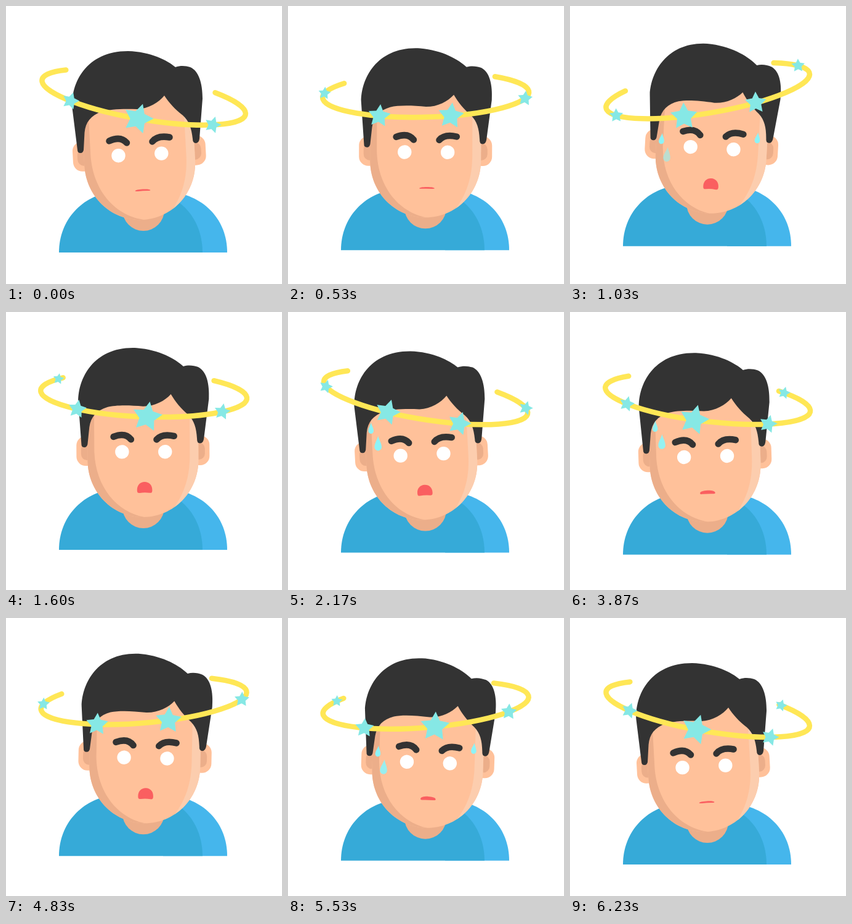
Animation of 448x450 px, one loop 6260 ms. Source, as an HTML page with a canvas:

```html
<!DOCTYPE html>
<html lang="en">
<head>
<meta charset="utf-8">
<title>Dizzy</title>
<style>
  html, body { margin: 0; width: 100%; height: 100%; overflow: hidden; background: #fff; }
  canvas { display: block; width: 448px; height: 450px; }
</style>
</head>
<body>
<canvas id="stage" width="448" height="450"></canvas>
<script>
const ctx = document.getElementById('stage').getContext('2d');
const LOOP = 6260, FRAMES = 188, PASS = 47;
const TAU = Math.PI * 2, RAD = Math.PI / 180, LEAN = 3.15 * RAD;

const C = {
  shirt: '#36aad8', shirtLight: '#45b6ec',
  skin: '#ffc19a', shade: '#ecae8a', light: '#fccdae',
  hair: '#333333', mouth: '#fa5f60',
  ring: '#ffe756', star: '#86e8e5', drop: '#8df3f7'
};

const P = {
  shirtLight: new Path2D('M255 301H270C322 308 359 346 359 399H255Z'),
  shirt: new Path2D('M86 399C86 346 124 307 172 301L262 308C298 322 319 358 319 399Z'),
  // The face is upright; the head leans it
  face: new Path2D('M133 175V253C133 306 174 346 223 346C272 346 313 306 313 253V175L298 135H148Z'),
  shade: new Path2D('M120 130H144V240C146 300 184 342 232 347V360H120Z'),
  glow: new Path2D('M330 130H299V245C299 285 288 315 262 345H330Z'),
  hair: new Path2D('M116 233L107.5 165C105 125 130 73 198 73C235 74 262 88 275 99C284 96 292 97 299 99C313 105 319 125 319 150L314 215Q313 222 308 222Q303 222 303 215C301 197 297 186 287 177C274 167 265 157 257 145C248 156 232 166 213 167C190 166 168 167 155 171C138 177 129 188 127.5 205L126 233Q125 238 121 238Q116 238 116 233Z'),
  brows: new Path2D('M167.5 218.5Q186 210 196 221.5M237.5 219.5Q246 209 265.5 212.5'),
  drop: new Path2D('M0 -.5C.05 -.25 .24 0 .24 .25C.24 .4 .12 .5 0 .5C-.12 .5 -.24 .4 -.24 .25C-.24 0 -.05 -.25 0 -.5Z')
};

const clamp = v => Math.max(0, Math.min(1, v));
const smooth = (a, b, v) => { const p = clamp((v - a) / (b - a)); return p * p * (3 - 2 * p); };

function fill(path, color) {
  ctx.fillStyle = color;
  ctx.fill(path);
}

function disc(x, y, r, color) {
  ctx.fillStyle = color;
  ctx.beginPath();
  ctx.arc(x, y, r, 0, TAU);
  ctx.fill();
}

function box(x, y, w, h, r, color) {
  ctx.fillStyle = color;
  ctx.beginPath();
  ctx.roundRect(x, y, w, h, r);
  ctx.fill();
}

function turnNeck(angle) {
  ctx.translate(223, 360);
  ctx.rotate(angle);
  ctx.translate(-223, -360);
}

// Orbit: open ellipse walked from the back left, along the front, to the back right
const RX = 167.5, RY = 36, FROM = 218 * RAD, TO = -47.6 * RAD;
const orbitAt = a => [RX * Math.cos(a), RY * Math.sin(a)];
const STEPS = 400, arc = [0];
for (let i = 1; i <= STEPS; i++) {
  const [x0, y0] = orbitAt(FROM + (TO - FROM) * (i - 1) / STEPS);
  const [x1, y1] = orbitAt(FROM + (TO - FROM) * i / STEPS);
  arc.push(arc[i - 1] + Math.hypot(x1 - x0, y1 - y0));
}
const LENGTH = arc[STEPS];

function pointAt(s) {
  let i = 1;
  while (i < STEPS && arc[i] < s) i++;
  const k = i - 1 + (s - arc[i - 1]) / (arc[i] - arc[i - 1]);
  return orbitAt(FROM + (TO - FROM) * k / STEPS);
}

const SIZES = [[0, 17], [.2, 24.5], [.42, 47], [.49, 48], [.72, 27], [1, 19]];
function starSize(u) {
  let i = 1;
  while (i < SIZES.length - 1 && SIZES[i][0] < u) i++;
  const [u0, a] = SIZES[i - 1], [u1, b] = SIZES[i];
  return a + (b - a) * (u - u0) / (u1 - u0);
}

function star(x, y, r) {
  ctx.beginPath();
  for (let i = 0; i < 10; i++) {
    const a = -10 * RAD + i * TAU / 10, q = i % 2 ? r * .51 : r;
    ctx.lineTo(x + q * Math.cos(a), y + q * Math.sin(a));
  }
  ctx.closePath();
  ctx.fillStyle = C.star;
  ctx.fill();
}

function orbit(frame, tilt) {
  ctx.save();
  ctx.translate(223.7, 147.5);
  ctx.rotate(tilt);
  ctx.strokeStyle = C.ring;
  ctx.lineWidth = 8.5;
  ctx.lineCap = 'round';
  ctx.beginPath();
  ctx.ellipse(0, 0, RX, RY, 0, TO, FROM);
  ctx.stroke();
  for (let i = 0; i < 4; i++) {
    const age = (frame + i * PASS / 4) % PASS;
    const s = age * (8.6 + .03 * age) - 1;
    if (s < 0 || s > LENGTH) continue;
    const [x, y] = pointAt(s);
    star(x, y, starSize(s / LENGTH) / 1.9);
  }
  ctx.restore();
}

function face() {
  ctx.save();
  turnNeck(-LEAN);
  box(115, 214.5, 32, 48, 15, C.skin);
  box(299, 214.5, 32, 48, 15, C.skin);
  box(122.5, 225.5, 22, 28, 10, C.shade);
  box(301.5, 225.5, 22, 28, 10, C.shade);
  fill(P.face, C.skin);
  ctx.clip(P.face);
  fill(P.glow, C.light);
  fill(P.shade, C.shade);
  ctx.restore();
}

function mouth(open) {
  const h = 3 + 15 * open;
  ctx.save();
  ctx.translate(222, 298);
  ctx.rotate(-LEAN);
  fill(new Path2D(`M-12.3 ${.22 * h}C-12.3 ${-.22 * h} -7 ${-.5 * h} 0 ${-.5 * h}` +
    `C7 ${-.5 * h} 12.3 ${-.22 * h} 12.3 ${.22 * h}C12.3 ${.48 * h} 11 ${.5 * h} 8 ${.49 * h}` +
    `Q0 ${.42 * h} -8 ${.49 * h}C-11 ${.5 * h} -12.3 ${.48 * h} -12.3 ${.22 * h}Z`), C.mouth);
  ctx.restore();
}

function drop(x, y, h, ms, start, fade) {
  const alpha = smooth(start, start + 50, ms) * (1 - smooth(fade, fade + 140, ms));
  if (!alpha) return;
  ctx.save();
  ctx.globalAlpha = alpha;
  ctx.translate(x, y + (ms - start) * .135);
  ctx.scale(h, h);
  fill(P.drop, C.drop);
  ctx.restore();
}

function sweat(ms) {
  drop(146, 212, 24, ms, 690, 970);
  drop(134.5, 187.5, 18, ms, 690, 1060);
  drop(289, 191, 18, ms, 850, 1180);
}

function head(angle, phase) {
  ctx.save();
  turnNeck(angle);
  face();
  fill(P.hair, C.hair);

  ctx.strokeStyle = C.hair;
  ctx.lineWidth = 10.5;
  ctx.lineCap = 'round';
  ctx.stroke(P.brows);
  disc(182.5, 242.2, 11.2, '#fff');
  disc(252.3, 238.6, 11.2, '#fff');
  mouth(smooth(.2, .32, phase) * (1 - smooth(.68, .8, phase)));

  const ms = phase * LOOP / 2;
  sweat(ms);
  sweat(ms - 1400);
  ctx.restore();
}

function draw(frame) {
  const t = frame / FRAMES;
  const phase = t * 2 % 1;
  const sway = lead => Math.cos(TAU * (3 * t + lead));
  ctx.fillStyle = '#fff';
  ctx.fillRect(0, 0, 448, 450);
  ctx.save();
  ctx.translate(0, -7 * (1 - Math.cos(TAU * phase)));
  fill(P.shirtLight, C.shirtLight);
  fill(P.shirt, C.shirt);
  disc(223, 330, 34, C.shade);
  head(LEAN * (1 - sway(0)), phase);
  orbit(frame, 9.7 * RAD * sway(.02));
  ctx.restore();
}

const begin = performance.now();
function tick() {
  const t = Math.max(0, performance.now() - begin) % LOOP;
  const snapped = Math.floor(t / 10) * 10 + 5;
  draw(Math.floor(snapped * FRAMES / LOOP) % FRAMES);
  requestAnimationFrame(tick);
}
tick();
</script>
</body>
</html>
```
